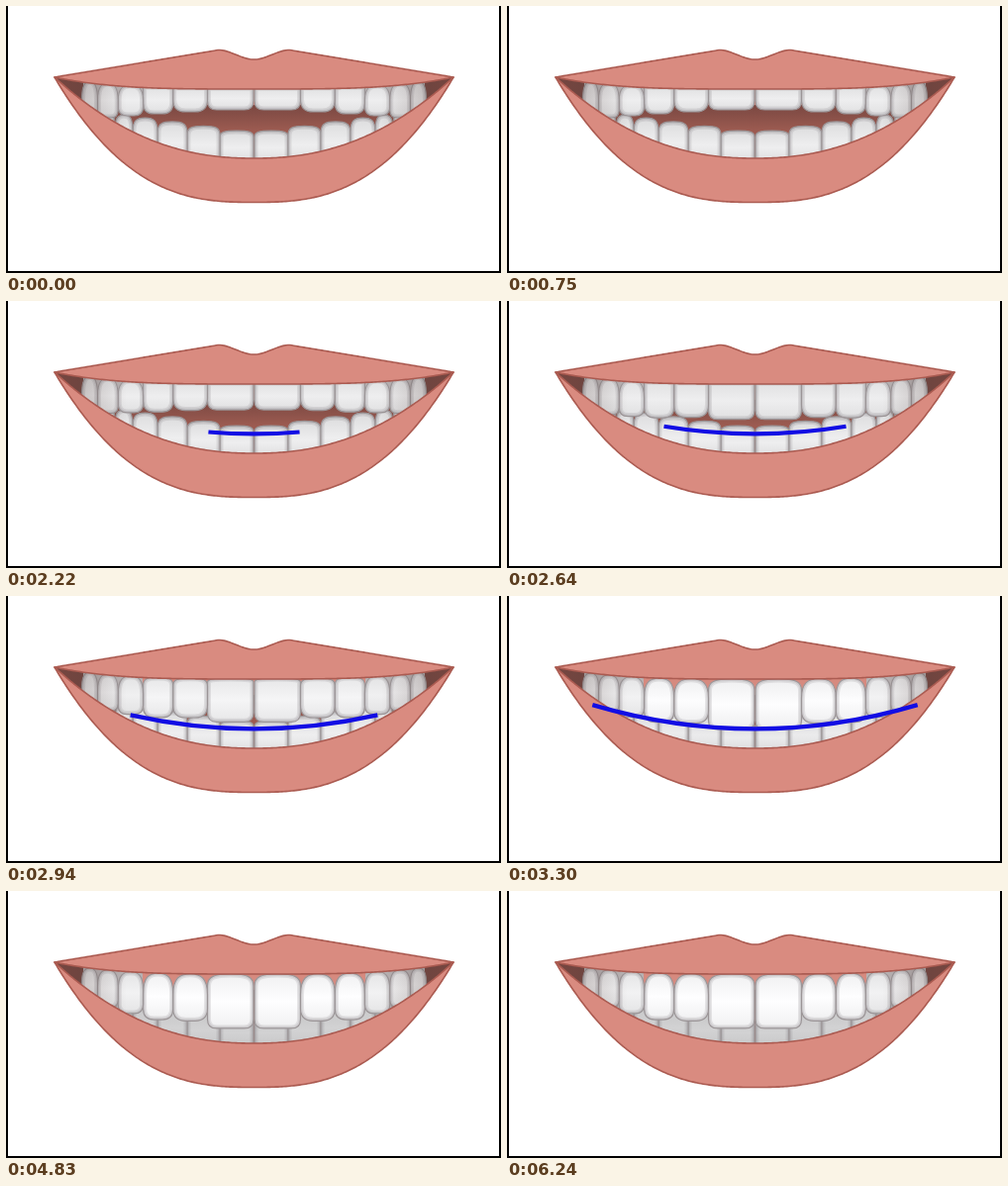
Animation of 500 by 270 pixels, one loop 6300 ms. Source, as an HTML page with a canvas:

```html
<!DOCTYPE html>
<html lang="en">
<head>
<meta charset="utf-8">
<title>Smile line</title>
<style>
  html, body { margin: 0; width: 100%; height: 100%; overflow: hidden; background: #fff; }
  canvas { display: block; width: 500px; height: 270px; }
</style>
</head>
<body>
<canvas id="stage" width="500" height="270"></canvas>
<script>
const ctx = document.getElementById('stage').getContext('2d');
const LOOP = 6300, MID = 250.5, REACH = 201.5, CORNER = 72, PER_SIDE = 6;

const clamp = v => Math.max(0, Math.min(1, v));
const progress = (t, from, to) => clamp((t - from) / (to - from));
const smooth = u => u * u * (3 - 2 * u);
const mix = (a, b, u) => a + (b - a) * u;
const grey = v => `rgb(${v | 0},${v | 0},${v + 1 | 0})`;

// Contours as heights; u runs from 0 in the middle to 1 at the mouth corner
const arc = (depth, power) => u => CORNER + depth * (1 - u ** power);
const lipBottom = arc(126.5, 2.7);
const openTop = arc(12, 3.5);
const openBottom = arc(82, 2.25);
const PEAK = .18;
function lipTop(u) {
  const dip = u < PEAK ? 9.5 * (1 + Math.cos(Math.PI * u / PEAK)) / 2 : 0;
  return CORNER - 27.5 * Math.min(1, (1 - u) / (1 - PEAK)) + dip;
}

function outline(top, bottom) {
  const path = new Path2D();
  for (let s = -1; s <= 1; s += .01) path.lineTo(MID + REACH * s, top(Math.abs(s)));
  path.lineTo(MID + REACH, CORNER);
  for (let s = 1; s >= -1; s -= .01) path.lineTo(MID + REACH * s, bottom(Math.abs(s)));
  path.closePath();
  return path;
}

const lips = outline(lipTop, lipBottom);
const opening = outline(openTop, openBottom);

function toothPath(x0, x1, top, bottom, arch, round) {
  const w = x1 - x0, cx = (x0 + x1) / 2, r = w * round;
  const side = top + arch * (bottom - top) * .55;
  const bend = mix(top, side, .2), inset = w * (.1 + .12 * arch);
  const p = new Path2D();
  p.moveTo(x0, side);
  p.bezierCurveTo(x0, bend, x0 + inset, top, cx, top);
  p.bezierCurveTo(x1 - inset, top, x1, bend, x1, side);
  p.lineTo(x1, bottom - r);
  p.quadraticCurveTo(x1, bottom, x1 - r, bottom);
  p.lineTo(x0 + r, bottom);
  p.quadraticCurveTo(x0, bottom, x0, bottom - r);
  p.closePath();
  return p;
}

function paintTooth(path, y0, y1, light, dark) {
  const fill = ctx.createLinearGradient(0, y0, 0, y1);
  fill.addColorStop(0, grey(dark));
  fill.addColorStop(.5, grey(light));
  fill.addColorStop(1, grey(dark));
  ctx.fillStyle = fill;
  ctx.fill(path);
  ctx.save();
  ctx.clip(path);
  ctx.strokeStyle = 'rgba(125,122,126,.17)';
  for (const width of [7, 4]) {
    ctx.lineWidth = width;
    ctx.stroke(path);
  }
  ctx.restore();
  ctx.lineWidth = 1.2;
  ctx.strokeStyle = '#9b9597';
  ctx.stroke(path);
}

// Walks outwards from the midline and visits each pair of teeth
function eachTooth(widthOf, draw) {
  let near = .5;
  for (let i = 0; i < PER_SIDE; i++) {
    const far = near + widthOf(i), centre = (near + far) / 2;
    draw(i, MID - far, MID - near, centre);
    draw(i, MID + near, MID + far, centre);
    near = far;
  }
}

function paintLowerTeeth(dim) {
  eachTooth(i => 34 - i * i, (i, x0, x1, centre) => {
    const top = 128.5 - .14 * centre;
    const path = toothPath(x0, x1, top, 166, .3 + .06 * i, .1);
    paintTooth(path, top, 160, mix(238, 210, dim), mix(220, 198, dim));
  });
}

function paintUpperTeeth(grow, shape) {
  eachTooth(i => i ? 39.5 - 4.7 * i : 46.5, (i, x0, x1, centre) => {
    const front = i < 3;
    const worn = 105 + 2 * i;
    const restored = 139.5 - .001 * centre ** 2 - (i === 1 ? 4 : 0);
    const arch = mix(front ? 0 : .9, i ? .8 : .4, shape);
    const top = openTop(centre / REACH) - mix(2, 0, shape);
    const bottom = mix(worn, restored, grow);
    const path = toothPath(x0, x1, top, bottom, arch, i ? .36 : .2);
    const white = front ? shape : shape * .3;
    paintTooth(path, top, bottom, mix(238, 254, white), mix(224, 240, white));
  });
}

function paintInside(t) {
  const grow = smooth(progress(t, 1740, 3720));
  const shape = smooth(clamp((grow - .42) / .5));

  ctx.save();
  ctx.clip(opening);
  const cavity = ctx.createLinearGradient(0, 98, 0, 126);
  cavity.addColorStop(0, '#774640');
  cavity.addColorStop(1, '#9c5b51');
  ctx.fillStyle = cavity;
  ctx.fillRect(49, 70, 404, 90);

  paintLowerTeeth(progress(t, 3200, 4200));

  ctx.fillStyle = '#b8b2b3';
  ctx.fillRect(78, 74, 345, 24);
  ctx.fillStyle = '#d68a7f';
  ctx.fillRect(138, 74, 225, 26);
  paintUpperTeeth(grow, shape);

  const shade = ctx.createLinearGradient(MID - REACH, 0, MID + REACH, 0);
  for (const [at, alpha] of [[0, 0], [.07, .25], [.18, 0]]) {
    shade.addColorStop(at, `rgba(85,65,62,${alpha})`);
    shade.addColorStop(1 - at, `rgba(85,65,62,${alpha})`);
  }
  ctx.fillStyle = shade;
  ctx.fillRect(49, 70, 404, 90);
  ctx.restore();
}

function paintSmileLine(t) {
  const half = 169 * progress(t, 1800, 3345);
  const alpha = 1 - progress(t, 3720, 4830);
  if (!half || !alpha) return;
  const y = 134.4, rise = .0009 * half * half;
  ctx.save();
  ctx.globalAlpha = alpha;
  ctx.strokeStyle = '#120de4';
  ctx.lineWidth = 4.2;
  ctx.beginPath();
  ctx.moveTo(MID - half, y - rise);
  ctx.quadraticCurveTo(MID, y + rise, MID + half, y - rise);
  ctx.stroke();
  ctx.restore();
}

function render(t) {
  ctx.fillStyle = '#fff';
  ctx.fillRect(0, 0, 500, 270);
  ctx.lineJoin = 'round';

  ctx.fillStyle = '#d98b80';
  ctx.fill(lips);
  paintInside(t);
  ctx.strokeStyle = '#ab5b51';
  ctx.lineWidth = 1.6;
  ctx.stroke(lips);
  ctx.stroke(opening);
  paintSmileLine(t);

  ctx.fillStyle = '#000';
  ctx.fillRect(0, 0, 2, 270);
  ctx.fillRect(498, 0, 2, 270);
  ctx.fillRect(0, 268, 500, 2);
}

const start = performance.now();
function tick() {
  render((performance.now() - start) % LOOP);
  requestAnimationFrame(tick);
}
tick();
</script>
</body>
</html>
```
